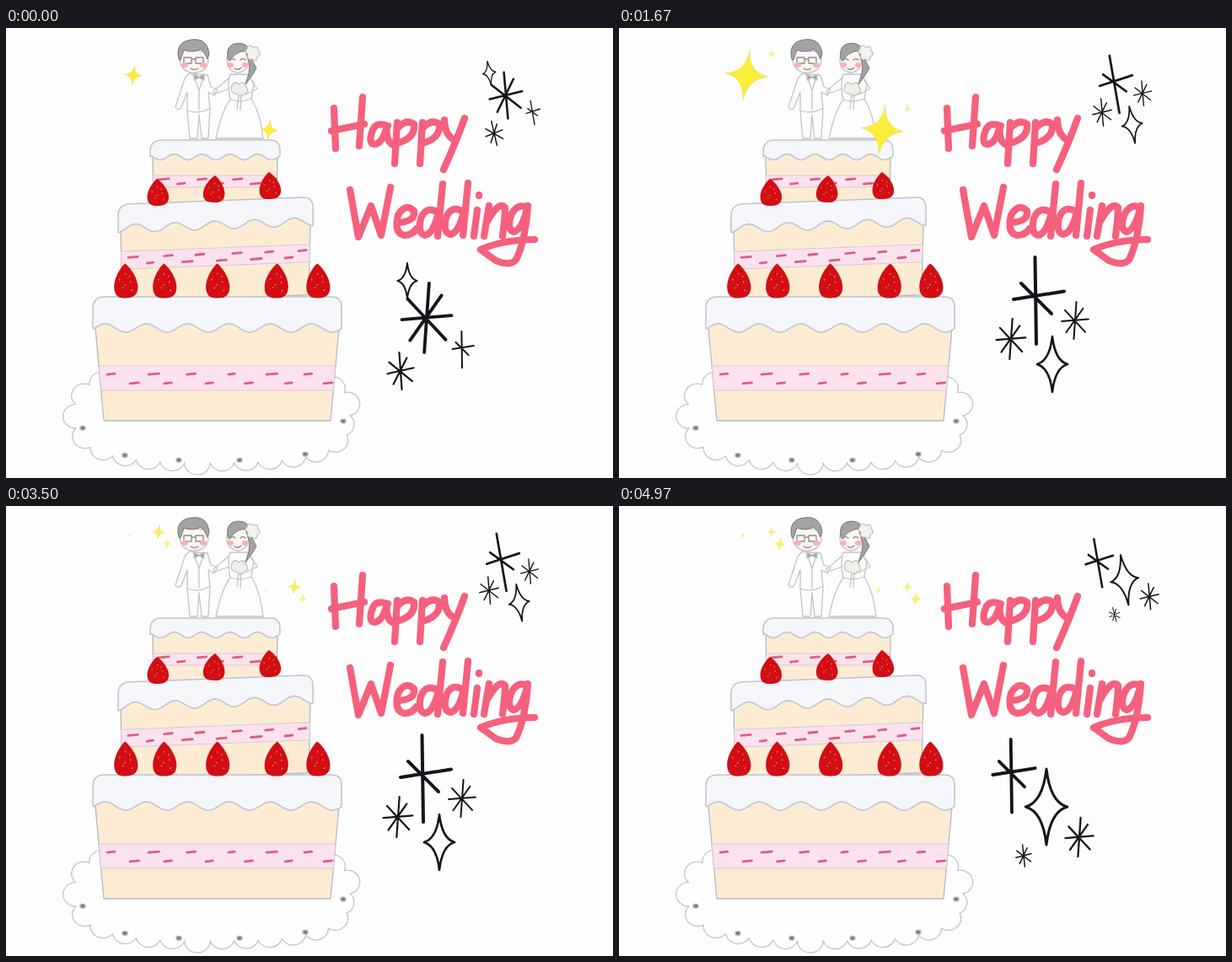
An HTML page that plays this animation: 720 px wide and 534 px high, repeating every 5010 ms.

```html
<!DOCTYPE html>
<html lang="en">
<head>
<meta charset="utf-8">
<title>Wedding cake</title>
<style>
html, body { margin: 0; height: 100%; overflow: hidden; background: #fdfdfd; }
svg { display: block; width: 720px; height: 534px; stroke-linecap: round; stroke-linejoin: round; }
#doily, .line { fill: none; stroke: #c4c4c6; stroke-width: 1.3; }
.cream { fill: #f4f6fa; stroke: #c0c3ca; stroke-width: 1.5; }
.body { fill: #fdecd4; stroke: #bcbcbe; stroke-width: 1.4; }
.band { fill: #fbe2ee; stroke: #d2cdd2; stroke-width: 1.1; }
.bits { fill: none; stroke: #dc5f7c; stroke-width: 2.8; }
.ink { fill: none; stroke: #14151a; }
.word { fill: none; stroke: #f5607d; stroke-width: 8.2; }
.hair { fill: #a3a3a6; stroke: #77777c; stroke-width: 1; }
</style>
</head>
<body>
<svg viewBox="0 0 720 534">
  <g id="doily"></g>

  <g id="couple" class="line">
    <path fill="#fdfdfd" d="M217 54L212 60 201 94Q204 99 208 94L215 76 215 98 218 131 227 131 229 103 232 131 240 131 242 96 240 76 247 80 251 73 243 70 239 56Z"/>
    <path d="M215 98Q229 103 242 95M222 55L229 74 235 55M229 74V97"/>
    <path fill="#fdf6f1" d="M206 33Q205 50 220 53 237 54 240 40L239 28 210 26Z"/>
    <path class="hair" d="M205 37Q200 17 219 14 239 11 241 31L239 37Q236 29 231 25 221 30 211 26L207 38Z"/>
    <path stroke="#8c8c90" d="M211 35h9v7h-9zM225 35h9v7h-9zM220 37h5M219 48Q223 51 228 48"/>
    <path fill="#a5a5a8" d="M223 55L229 58 235 55V62L229 59 223 62Z"/>
    <path fill="#fdfdfd" d="M266 55Q262 64 266 85 256 98 249 131H305Q302 102 291 84L294 65 287 55Z"/>
    <path d="M266 85Q278 89 291 84M265 59L247 74Q244 79 251 77L265 72M291 62L298 72 284 79"/>
    <path fill="#fdf6f1" d="M262 35Q261 51 275 53 289 51 289 34L282 24 266 25Z"/>
    <path class="hair" d="M263 36Q260 19 275 18 290 17 291 36L297 48 290 59 284 67 288 54 289 44 284 27Q272 28 265 39Z"/>
    <path stroke="#8c8c90" d="M266 38Q269 35 272 38M278 38Q281 35 284 38M271 48Q275 51 279 47"/>
    <path fill="#f3f3ee" d="M286 25Q287 18 293 23 299 20 299 27 304 31 298 34 298 41 292 37 285 38 287 31 282 28 286 25Z"/>
    <path fill="#eef2e6" d="M268 68Q271 62 276 67 283 62 284 69 290 75 283 78 278 84 274 78 265 78 268 68ZM276 79L274 96M279 79L278 97"/>
    <g id="cheeks" fill="#f8b0b4" stroke="none"></g>
  </g>

  <g id="cake"></g>
  <g id="words" class="word" role="img" aria-label="Happy Wedding"></g>
  <g id="ink"></g>
  <g id="glitter" fill="#fbee3a" stroke="#ecdc5a"></g>
</svg>
<script>
const LOOP = 5010, INK_CYCLE = 900, GLITTER_CYCLE = 1430;
const $ = id => document.getElementById(id);
const clamp = v => Math.max(0, Math.min(1, v));
let seed = 7;
const random = () => (seed = seed * 16807 % 2147483647) / 2147483647;

$('cheeks').innerHTML = [212, 234, 266, 284].map(x => `<ellipse cx="${x}" cy="44" rx="4" ry="3"/>`).join('');

// Doily: scallops of equal width around a superellipse
function doily() {
  const power = v => Math.sign(v) * Math.abs(v) ** (2 / 3);
  const joints = [];
  for (let a = 0; a < 2 * Math.PI; a += .005) {
    const p = [245 + 163 * power(Math.cos(a)), 460 - 56 * power(Math.sin(a))];
    const last = joints.at(-1);
    if (!last || Math.hypot(p[0] - last[0], p[1] - last[1]) > 28) joints.push(p);
  }
  const rim = joints.concat([joints[0]]).map((p, i) => (i ? 'A15 14 0 0 0 ' : 'M') + p).join('');
  const holes = [91, 141, 205, 277, 355, 400].map(x => {
    const y = 460 + 53 * Math.cbrt(1 - Math.abs((x - 245) / 155.1) ** 3);
    return `<ellipse cx="${x}" cy="${y}" rx="3.2" ry="2.6" fill="#7c7c80"/>`;
  });
  return `<path fill="#fefefe" d="${rim}"/>` + holes.join('');
}

// One cake tier: a tapering body, a band with fruit bits, cream with a wavy lower edge
function tier({ left, right, top, slope, drip, bottom, taper, band, depth, wave, crest, amp, bits }) {
  const mid = (left + right) / 2;
  const at = (x, y) => `${x} ${y + slope * (x - mid)}`;
  const side = y => taper * (y - drip) / (bottom - drip) + 3;
  const strip = (y1, y2) => 'M' + [at(left + side(y1), y1), at(right - side(y1), y1),
    at(right - side(y2), y2), at(left + side(y2), y2)].join('L') + 'Z';

  let edge = '';
  for (let x = right; x >= left; x -= 3)
    edge += 'L' + at(x, drip + amp * Math.cos((x - crest) / wave * 2 * Math.PI));
  const cream = `M${at(left, drip)}L${at(left, top + 14)}Q${at(left, top)} ${at(left + 14, top)}` +
    `L${at(right - 12, top)}Q${at(right, top)} ${at(right, top + 12)}${edge}Z`;

  let marks = '';
  for (let i = 0; i < bits; i++) {
    const x = left + side(band) + (i + .3 + random() * .3) * (right - left - 2 * side(band)) / bits;
    marks += `M${at(x, band + depth * (i % 2 ? .72 : .35))}l${7 + random() * 6} -1`;
  }
  return `<path class="body" d="${strip(drip - 8, bottom)}"/><path class="band" d="${strip(band, band + depth)}"/>
    <path class="bits" d="${marks}"/><path class="cream" d="${cream}"/>`;
}

const seeds = Array.from({ length: 7 }, (_, i) =>
  `<circle cx="${.5 * Math.sin(i * 2.4)}" cy="${-.4 + i * .16}" r=".055" fill="#f27565"/>`).join('');
const berry = (x, y, w, h) => `<g transform="translate(${x} ${y}) rotate(${4 * Math.sin(x)}) scale(${w} ${h})">
  <path fill="#d20e14" d="M0-1C.3-.85 1-.2 .97.4 .93.95 .4 1 0 1-.5 1-.93.95-.97.4-1-.2-.3-.85 0-1Z"/>${seeds}</g>`;

$('doily').innerHTML = doily();
$('cake').innerHTML =
  tier({ left: 171, right: 325, top: 133, slope: 0, drip: 153, bottom: 212, taper: 1, band: 175, depth: 14,
    wave: 33, crest: 183, amp: 3.5, bits: 7 }) +
  tier({ left: 133, right: 364, top: 205, slope: -.038, drip: 234, bottom: 321, taper: 2, band: 261, depth: 21,
    wave: 47, crest: 224, amp: 5, bits: 11 }) +
  tier({ left: 103, right: 398, top: 319, slope: 0, drip: 356, bottom: 466, taper: 10, band: 401, depth: 29,
    wave: 49, crest: 142, amp: 5, bits: 12 }) +
  [180, 247, 313].map((x, i) => berry(x, 195 - 4 * i, 13.2, 16)).join('') +
  [142, 188, 251, 321, 370].map(x => berry(x, 300, 14.5, 20.5)).join('');

// Brush letters, each drawn from its own upper left corner
const glyphs = {
  H: 'M3 13L5 61M37 0L33 58M0 40L39 32',
  a: 'M20 4Q6-1 2 9-4 25 4 26 14 25 19 4 17 21 25 26',
  p: 'M1 0L-2 49M1 7Q12-5 21 2 23 19 0 25',
  y: 'M1 2Q1 18 11 25M25 0Q15 28 0 61',
  W: 'M0 9L10 65 25 28 37 63 48 6',
  e: 'M2 17Q24 16 22 3 12-7 3 8-2 29 10 32 20 32 25 24',
  d: 'M23 33Q10 26 4 41 0 59 9 61 19 59 25 34M30 0L24 62',
  i: 'M2 18L-2 49M4 0V1',
  n: 'M6 0L0 36M3 20Q17-6 25 2 25 13 22 36',
  g: 'M55 6Q44 0 36 15 31 32 39 35 49 33 56 4 53 46 42 68 35 76 18 69L0 56Q27 44 64 44'
};
const write = (text, spots) => [...text].map((c, i) =>
  `<path transform="translate(${spots[i]})" d="${glyphs[c]}"/>`).join('');
$('words').innerHTML =
  write('Happy', ['386 82', '433 112', '463 112', '493 112', '519 107']) +
  write('Wedding', ['408 183', '462 214', '488 185', '518 184', '557 198', '567 211', '563 207']);

const STAR = 'M0-1Q.1-.12 .55 0 .1.12 0 1-.1.12-.55 0-.1-.12 0-1Z';
const GLINT = 'M0-1Q.08-.12 .87-.06 .13.12 0 1-.08.12-.85.03-.06-.1 0-1Z';
const BURST = 'M.07-1L-.07 1M-.72.05L.72-.07M-.55-.55L.55.63M.43-.65L-.48.65';
const CROSS = 'M-.03-1L0 1.06M-.54 0L.66-.19M-.36-.38L.36.34';
const stamp = d => (x, y, r, width, turn = 0) =>
  `<path stroke-width="${width / r}" transform="translate(${x} ${y}) rotate(${turn}) scale(${r})" d="${d}"/>`;
const [spark, glint, burst, cross] = [STAR, GLINT, BURST, CROSS].map(stamp);

// Three ink poses; the upper cluster is a smaller, turned copy
const poses = [
  spark(476, 300, 21, 2) + burst(499, 344, 41, 3.8) + burst(468, 407, 22, 2.2, -8) + cross(541, 381, 21, 2),
  cross(495, 322, 50, 4) + burst(541, 347, 22, 2) + burst(465, 369, 24, 2.2) + spark(514, 399, 33, 2.6),
  cross(466, 319, 42, 3.8) + spark(507, 357, 45, 3) + burst(546, 393, 23, 2.3) + burst(480, 415, 13, 1.5, -10)
];
$('ink').innerHTML = poses.map(pose => `<g class="ink">${pose}
  <g transform="translate(593 80) rotate(-9) scale(.67) translate(-499 -344)">${pose}</g></g>`).join('');
const poseNodes = [...$('ink').children];

// Each glint swells around its peak time within the cycle
const glints = [
  { x: 151, y: 56, size: 29, peak: 200, span: 285 },
  { x: 181, y: 31, size: 15, peak: 470, span: 290 },
  { x: 191, y: 45, size: 9, peak: 760, span: 200 },
  { x: 147, y: 35, size: 6, peak: 860, span: 280 },
  { x: 167, y: 59, size: 8, peak: 1160, span: 200 }
];

function draw(now) {
  const t = now % LOOP;
  const beat = t % INK_CYCLE;
  const pose = beat < 290 ? 0 : beat < 600 ? 2 : 1;
  poseNodes.forEach((node, i) => node.style.display = i === pose ? '' : 'none');

  const phase = t % GLITTER_CYCLE;
  const stars = glints.map(({ x, y, size, peak, span }) => {
    const gap = Math.abs(phase - peak);
    const near = Math.min(gap, GLITTER_CYCLE - gap);
    const r = size * clamp(1.3 * (1 - near / span));
    return r > .3 ? `<g opacity="${clamp(.45 + r / 20)}">${glint(x, y, r, .7, 8)}</g>` : '';
  }).join('');
  $('glitter').innerHTML = `${stars}<g transform="translate(161 65)">${stars}</g>`;
}

let begin;
function tick(now) {
  begin ??= now;
  draw(now - begin);
  requestAnimationFrame(tick);
}
draw(0);
requestAnimationFrame(tick);
</script>
</body>
</html>
```
